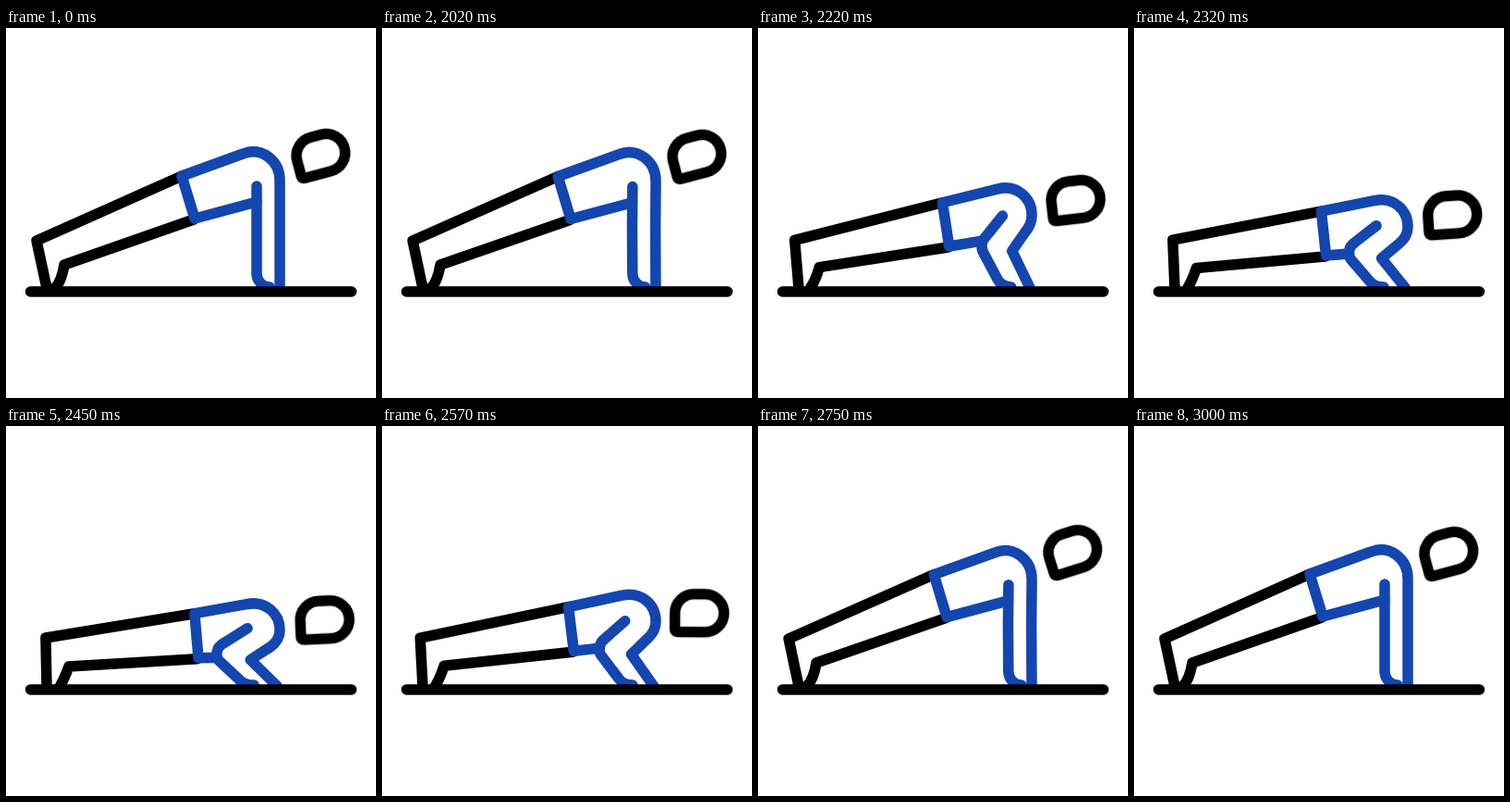
These frames come from a looping animation (400x400 px, 3020 ms). An HTML page:

```html
<!DOCTYPE html>
<html lang="en">
<head>
<meta charset="utf-8">
<title>Push-up</title>
<style>
  html, body { margin: 0; width: 100%; height: 100%; overflow: hidden; background: #fff; }
  svg { display: block; width: 100%; height: 100%; }
  path {
    fill: none;
    stroke: #000;
    stroke-width: 11.5;
    stroke-linecap: round;
    stroke-linejoin: round;
  }
  .shirt { stroke: #1446b0; }

  /* Each limb morphs between its raised and lowered outline. */
  .limb { d: var(--up); animation: press 3020ms infinite; }
  .legs {
    --up: path("M190 160 L33 230 L44 281 M203 207 L63 256 C61 268 58 277 52 282");
    --down: path("M204 203 L43 229 L44 281 M207 252 L68 260 C65 268 62 275 58 282");
  }
  .torso {
    --up: path("M271 188 L204 206 L190 160 L256 136 C276 128 296 143 296 165 C296 172 296 175 296 182 L296 217 L296 281");
    --down: path("M228 251 L208 251 L204 203 L260 193 C281 189 296 203 296 221 C296 230 292 235 286 239 L264 253 L293 281");
  }
  .arm {
    --up: path("M271 171 L271 204 C271 210 271 215 271 220 L271 265 C271 273 277 280 285 280");
    --down: path("M261 219 L235 235 C226 240 226 250 230 254 L253 275 C257 279 262 280 268 280");
  }

  .neck { animation: drop 3020ms infinite; }
  .nod { transform-origin: 283px 140px; animation: nod 3020ms infinite; }

  @keyframes press {
    0%, 65.9% { d: var(--up); animation-timing-function: cubic-bezier(.33, 0, .3, 1); }
    82.78% { d: var(--down); animation-timing-function: cubic-bezier(.33, 0, .67, 1); }
    91.72%, 100% { d: var(--up); }
  }
  @keyframes drop {
    0%, 65.9% { transform: translate(0, 0); animation-timing-function: cubic-bezier(.33, 0, .3, 1); }
    82.78% { transform: translate(4.9px, 61px); animation-timing-function: cubic-bezier(.33, 0, .67, 1); }
    91.72%, 100% { transform: translate(0, 0); }
  }
  /* The head lags behind the body, then swings past and settles. */
  @keyframes nod {
    0%, 65.9% { transform: rotate(0deg); animation-timing-function: cubic-bezier(.33, 0, .3, 1); }
    82.78% { transform: rotate(12.5deg); animation-timing-function: cubic-bezier(.33, 0, .67, 1); }
    86.42% { transform: rotate(16.5deg); animation-timing-function: cubic-bezier(.33, 0, .67, 1); }
    93.38% { transform: rotate(-9deg); animation-timing-function: cubic-bezier(.33, 0, .67, 1); }
    99.34%, 100% { transform: rotate(0deg); }
  }
</style>
</head>
<body>
<svg viewBox="0 0 400 400">
  <path class="limb legs"/>
  <path class="limb torso shirt"/>
  <path class="limb arm shirt"/>
  <path d="M26.5 285H373.5"/>
  <g class="neck">
    <g class="nod">
      <path transform="translate(340.3 136.5) rotate(-15)"
            d="M-23.5 20.5Q-26.5 20.5 -26.5 17.5V0A20.5 20.5 0 0 1 -6 -20.5H6A20.5 20.5 0 0 1 6 20.5Z"/>
    </g>
  </g>
</svg>
</body>
</html>
```
